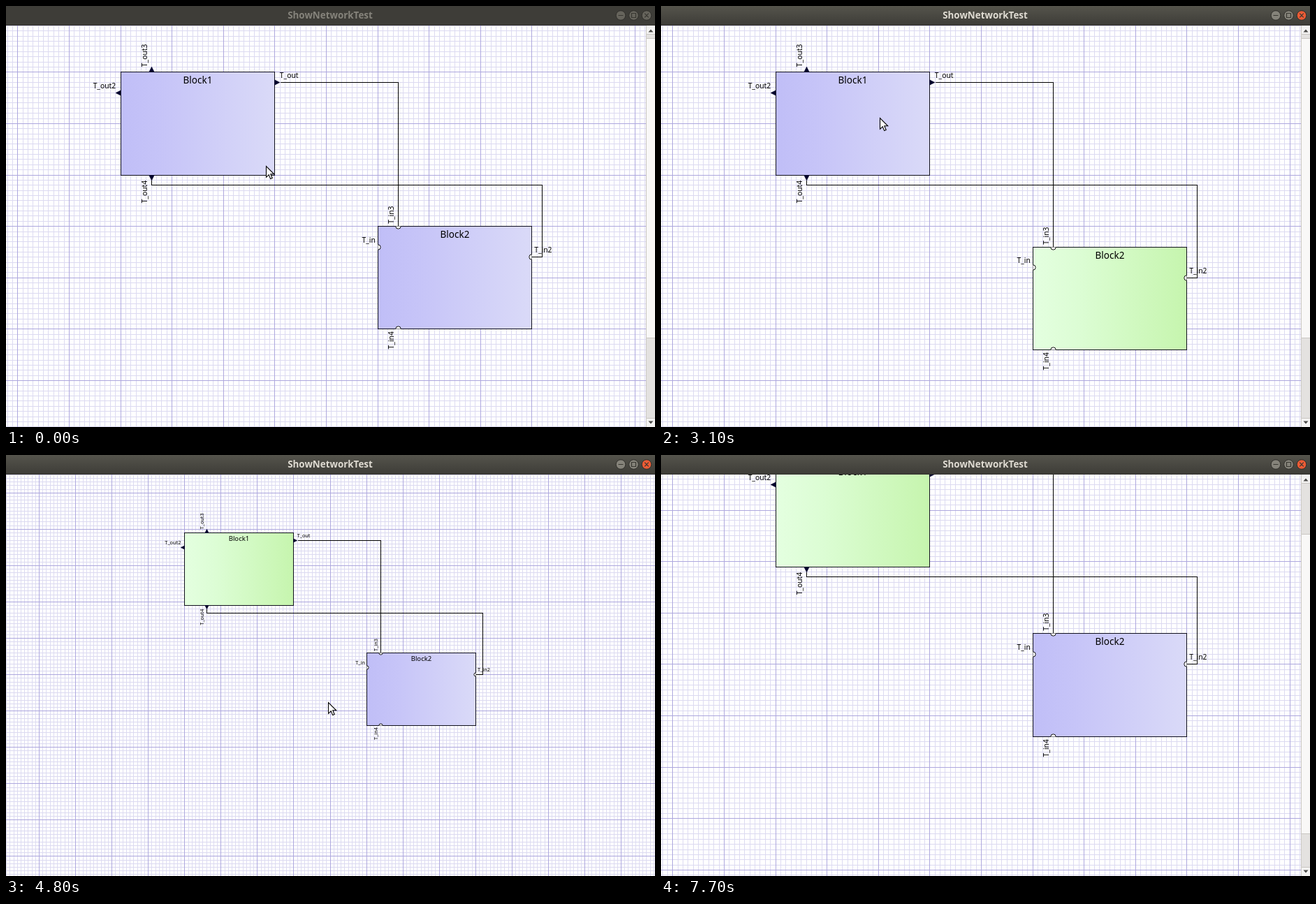
These frames come from a looping animation (929x603 px, 8000 ms). An HTML page:

```html
<!DOCTYPE html>
<html lang="en">
<head>
<meta charset="utf-8">
<title>ShowNetworkTest</title>
<style>
  html, body { margin: 0; width: 100%; height: 100%; overflow: hidden; background: #fff; }
  svg { display: block; }
  text { font-family: "Noto Sans", "Open Sans", sans-serif; fill: #000; }
  .crisp { shape-rendering: crispEdges; fill: none; }
</style>
</head>
<body>
<svg width="929" height="603" viewBox="0 0 929 603">
  <defs>
    <linearGradient id="blue">
      <stop offset="0" stop-color="#c0bef7"/><stop offset=".3" stop-color="#c7c5f8"/>
      <stop offset="1" stop-color="#dadaf8"/>
    </linearGradient>
    <linearGradient id="green">
      <stop offset="0" stop-color="#e4ffe0"/><stop offset=".3" stop-color="#dcfdd4"/>
      <stop offset="1" stop-color="#c6f5ae"/>
    </linearGradient>
    <linearGradient id="bar" x2="0" y2="1">
      <stop offset="0" stop-color="#55544c"/><stop offset="1" stop-color="#3d3c37"/>
    </linearGradient>
  </defs>
  <g id="scene"></g>
  <g id="scroll"></g>
  <g id="title"></g>
  <path id="cursor" d="M.5 .5V16.3L4.2 12.8L6.7 18.6L9.2 17.5L6.8 11.8H11.7Z" fill="#fff" stroke="#000" stroke-width="1.1"/>
</svg>
<script>
const LOOP = 8000, STEP = 100;
const UNIT = 7.362;               // one minor grid cell at zoom 1
const W = 929, H = 603, TOP = 28;
const $ = id => document.getElementById(id);

// pointer path: time, x, y
const POINTER = [
  [0, 372, 229], [100, 372, 229], [300, 460, 285], [500, 600, 382], [600, 639, 408],
  [800, 639, 408], [900, 641, 410], [1000, 634, 428], [1100, 622, 449], [1200, 615, 459],
  [1300, 614, 462], [1400, 616, 460], [1700, 627, 440], [1800, 634, 439], [1900, 640, 440],
  [2000, 639, 420], [2200, 632, 342], [2300, 632, 342], [2700, 546, 198], [2800, 546, 198],
  [3100, 313, 160], [3200, 304, 158], [3300, 304, 158], [3500, 297, 166], [3600, 299, 165],
  [3700, 303, 160], [3800, 305, 165], [4100, 441, 323], [4200, 441, 323], [4300, 461, 353],
  [4700, 461, 353], [4800, 461, 354], [5800, 461, 354], [5900, 460, 355], [6400, 460, 355],
  [6500, 460, 356], [6700, 460, 356], [6800, 482, 366], [6900, 545, 368], [7000, 622, 359],
  [7200, 765, 329], [7500, 917, 284]
];

// time, zoom, origin x, origin y, scrollbar shown
const Z = Math.pow(2, -1 / 6);
const VIEWS = [
  [0, 1, 164, 94.8, 1], [4700, Z * Z, 225, 86.3, 1], [4800, Z ** 3, 255.8, 106.4, 0],
  [5600, Z * Z, 230.5, 75.8, 0], [5700, Z * Z, 224.5, 78, 1],
  [5900, Z, 195.5, 43.4, 1], [6200, 1, 164, 5.5, 1]
];

function pointerAt(t) {
  const i = POINTER.findIndex(p => p[0] > t);
  if (i < 0) return POINTER[POINTER.length - 1].slice(1);
  const [a, ax, ay] = POINTER[i - 1], [b, bx, by] = POINTER[i];
  const f = (t - a) / (b - a);
  return [ax + (bx - ax) * f, ay + (by - ay) * f];
}

// whole cells a block has been dragged between two times
function drag(t, from, to) {
  if (t < from) return [0, 0];
  const g = pointerAt(from), p = pointerAt(Math.min(t, to));
  return [0, 1].map(i => Math.round((p[i] - g[i]) / UNIT));
}

const snap = v => Math.floor(v) + .5;
const line = (d, color) => `<path class="crisp" d="${d}" stroke="${color}"/>`;

function gridPath(u, ox, oy, w, major) {
  let d = "";
  const keep = i => (i % 10 === 0) === major;
  for (let i = Math.ceil(-ox / u); ox + i * u < w; i++)
    if (keep(i)) d += `M${snap(ox + i * u)} ${TOP}V${H}`;
  for (let i = Math.ceil((TOP - oy) / u); oy + i * u < H; i++)
    if (keep(i)) d += `M0 ${snap(oy + i * u)}H${w}`;
  return d;
}

function drawScene(view, a, b, picked) {
  const [, k, ox, oy, bar] = view, u = UNIT * k, w = bar ? 917 : W;
  const X = x => snap(ox + x * u), Y = y => snap(oy + y * u);

  const label = (s, x, y, anchor, turn) =>
    `<text font-size="${10.3 * k}" text-anchor="${anchor}" transform="translate(${x} ${y})${turn ? " rotate(-90)" : ""}">${s}</text>`;

  const block = (name, [x, y], on) =>
    `<rect x="${X(x)}" y="${Y(y)}" width="${X(x + 30) - X(x)}" height="${Y(y + 20) - Y(y)}" fill="url(#${on ? "green" : "blue"})" stroke="#10101c" shape-rendering="crispEdges"/>` +
    `<text font-size="${13.5 * k}" text-anchor="middle" x="${X(x + 15)}" y="${oy + (y + 2.25) * u}">${name}</text>`;

  // a port sits at cell (x, y); (dx, dy) is where its marker points
  function port(name, x, y, dx, dy, out) {
    const px = X(x), py = Y(y), r = u / 2;
    const from = `M${px + r * dy} ${py - r * dx}`, to = `${px - r * dy} ${py + r * dx}`;
    const mark = out
      ? `<path d="${from}L${px + u * dx} ${py + u * dy}L${to}Z" fill="#00002c" stroke="#00002c" stroke-width=".6"/>`
      : `<path d="${from}A${r} ${r} 0 0 1 ${to}" fill="#fff" stroke="#111"/>`;
    const side = out ? 1 : -1, gap = u * (out ? 1 : .5), up = .86 * u;
    const sx = dx * side, sy = dy * side;
    return mark + (dx
      ? label(name, px + sx * gap, py - up, sx > 0 ? "start" : "end")
      : label(name, px - up, py + sy * gap, sy > 0 ? "end" : "start", true));
  }

  const [ax, ay] = a, [bx, by] = b;
  const wires =
    `M${X(ax + 31)} ${Y(ay + 2)}H${X(bx + 4)}V${Y(by)}` +
    `M${X(ax + 6)} ${Y(ay + 21)}V${Y(ay + 22)}H${X(bx + 32)}V${Y(by + 6)}H${X(bx + 30)}`;

  $("scene").innerHTML =
    line(gridPath(u, ox, oy, w, false), "#dcdaf1") +
    line(gridPath(u, ox, oy, w, true), "#aea8de") +
    block("Block1", a, picked === 1) + block("Block2", b, picked === 2) +
    line(wires, "#000") +
    port("T_out", ax + 30, ay + 2, 1, 0, true) +
    port("T_out2", ax, ay + 4, -1, 0, true) +
    port("T_out3", ax + 6, ay, 0, -1, true) +
    port("T_out4", ax + 6, ay + 20, 0, 1, true) +
    port("T_in", bx, by + 4, 1, 0) +
    port("T_in2", bx + 30, by + 6, -1, 0) +
    port("T_in3", bx + 4, by, 0, 1) +
    port("T_in4", bx + 4, by + 20, 0, -1);
}

function drawScroll([, k, , oy, bar]) {
  const total = 734 * k, groove = 549;
  const y = Math.round(41 + Math.max(0, TOP + 73.4 * k - oy) * groove / total);
  const h = Math.min(590 - y, Math.round(groove * (H - TOP) / total));
  $("scroll").innerHTML = !bar ? "" :
    `<path d="M917 28h12v575h-12z" fill="#f4f3f2"/><path d="M917 41h12v549h-12z" fill="#e4e2e0"/>` +
    `<path d="M917 ${y}h12v${h}h-12z" fill="#f9f8f7"/>` +
    line(`M916.5 28V603M917 40.5H929M917 590.5H929M917 ${y + .5}H929M917 ${y + h - .5}H929`, "#c9c6c2") +
    `<path d="M919.5 37.5L923 33.5L926.5 37.5ZM919.5 594.5L923 598.5L926.5 594.5Z" fill="#4a4a48"/>`;
}

function drawTitle(active) {
  const disc = (x, fill) => `<circle cx="${x}" cy="13.5" r="6.8" fill="${fill}" stroke="#302f2b"/>`;
  const grey = active ? "#85837a" : "#66645c";
  $("title").innerHTML =
    `<rect width="929" height="28" fill="${active ? "url(#bar)" : "#3e3d38"}"/>` +
    `<rect y="27" width="929" height="1" fill="#33322e"/>` +
    `<text x="464" y="18.3" text-anchor="middle" font-size="13.4" font-weight="700" style="fill:${active ? "#dfdbd2" : "#85837b"}">ShowNetworkTest</text>` +
    disc(880, grey) + disc(898.5, grey) + disc(917, active ? "#ec5b35" : grey) +
    `<path d="M876.5 13.5h7M895.5 10.5h6v6h-6zM914.2 10.7l5.6 5.6M919.8 10.7l-5.6 5.6" fill="none" stroke="#383731" stroke-width="1.2"/>`;
}

let last = -1;
function render(now) {
  const t = Math.floor(now % LOOP / STEP) * STEP;
  if (t !== last) {
    last = t;
    const view = VIEWS.filter(v => v[0] <= t).pop();
    const d1 = drag(t, 3300, 3800), d2 = drag(t, 900, 1900);
    const picked = t >= 3300 ? 1 : t >= 900 ? 2 : 0;
    drawScene(view, d1, [50 + d2[0], 30 + d2[1]], picked);
    drawScroll(view);
    drawTitle(t >= 900);
    const [x, y] = pointerAt(t);
    $("cursor").setAttribute("transform", `translate(${Math.round(x)} ${Math.round(y)})`);
    $("cursor").setAttribute("visibility", t < 7700 ? "visible" : "hidden");
  }
}

let start;
function tick(now) {
  if (start === undefined) start = now;
  render(now - start);
  requestAnimationFrame(tick);
}
render(0);
requestAnimationFrame(tick);
</script>
</body>
</html>
```
